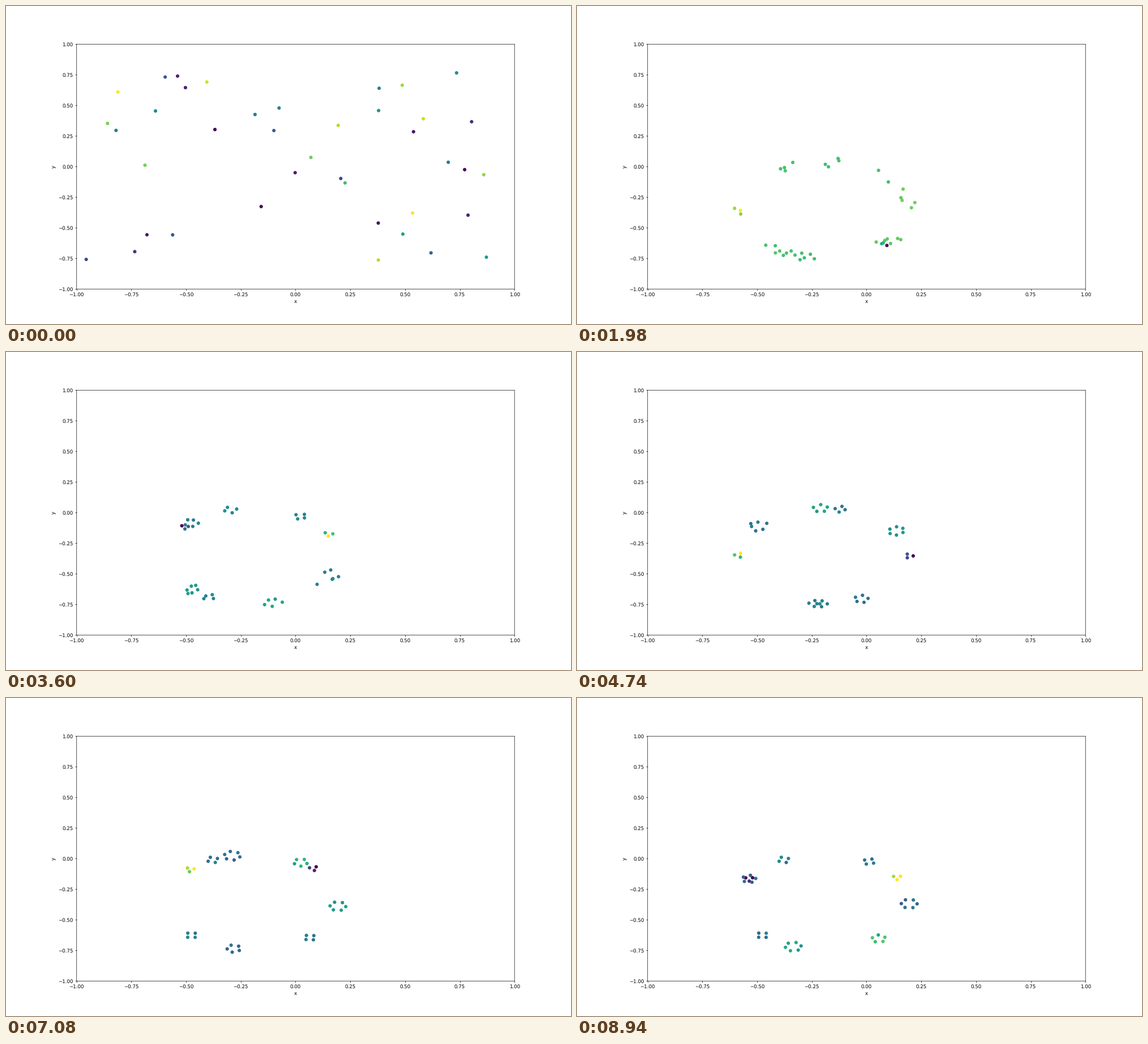
Write a matplotlib script that moves like this. It is 998x561 px and loops after 9 s.

```python
import numpy as np
import matplotlib.pyplot as plt
from matplotlib.animation import FuncAnimation

FRAMES, STEP = 150, 60
DPI = 62.375
CENTRE = np.array([-0.195, -0.355])
RADIUS = 0.39
SPIN = 2.383        # radians per second around the ring
GATHER = 2.6        # seconds for the flocks to draw together
END = (FRAMES - 1) * STEP / 1000

# Last angle in degrees, number of dots, way round, shade.
FLOCKS = [(151, 3, -1, .05), (151, 5, 1, .35), (118, 4, 1, .42),
          (58, 4, -1, .43), (-2, 6, 1, .33), (-50, 5, 1, .66),
          (249, 6, 1, .56), (224, 4, -1, .41), (31, 3, 1, .92)]

plt.rcParams.update({"path.snap": False, "text.hinting": "none"})
rng = np.random.default_rng(12)

# One row per dot: each flock is a small polygon.
angle, size, way, tone, corner = np.array(
    [(np.radians(a), n, w, c, 2 * np.pi * k / n)
     for a, n, w, c in FLOCKS for k in range(n)]).T
COUNT = len(angle)
tone = tone + rng.uniform(-.08, .08, COUNT)
tone[0], tone[-1] = 0, 1


def pace(t):
    """Turning gathers speed for a second, then stays even."""
    return t * t / 2 if t < 1 else t - 0.5


def orbit(t):
    return angle + way * SPIN * (pace(t) - pace(END))


def scatter_start():
    """Random places, handed out in ring order; angle offset and radius."""
    spots = rng.uniform((-.97, -.88), (.97, .83), (COUNT, 2)) - CENTRE
    turn = np.arctan2(spots[:, 1], spots[:, 0]) % (2 * np.pi)
    by_turn = np.argsort(turn)
    by_slot = np.argsort(orbit(0) % (2 * np.pi))
    offset, reach = np.empty(COUNT), np.empty(COUNT)
    offset[by_slot] = turn[by_turn] - orbit(0)[by_slot]
    reach[by_slot] = np.hypot(*spots[by_turn].T)
    return (offset + np.pi) % (2 * np.pi) - np.pi, reach


offset, reach = scatter_start()
first_tone = rng.uniform(0, 1, COUNT)
first_tone[0], first_tone[-1] = 0, 1


def swarm(i):
    t = i * STEP / 1000
    v = min(t, 1)
    v = v * v * (3 - 2 * v)

    a = orbit(t) + offset * np.exp(-(t / GATHER) ** 2)
    r = reach + (RADIUS - reach) * v
    tilt = corner + a
    spread = 0.006 * size * v
    x = r * np.cos(a) + spread * np.cos(tilt)
    y = r * np.sin(a) + spread * np.sin(tilt)

    # Shades start mixed, turn alike, then settle flock by flock.
    level = 0.4 + 0.4 * np.exp(-max(t - 2, 0) / 1.2)
    shade = level + (tone - level) * t / END
    shade[0], shade[-1] = 0, 1
    shade = first_tone + (shade - first_tone) * v
    return CENTRE + np.column_stack([x, y]), shade


fig, ax = plt.subplots(figsize=(16, 8.994), dpi=DPI)
ax.set(xlim=(-1, 1), ylim=(-1, 1), xlabel="x", ylabel="y")
xy, shade = swarm(0)
dots = ax.scatter(*xy.T, c=shade, cmap="viridis", vmin=0, vmax=1)


def draw(i):
    xy, shade = swarm(i)
    dots.set_offsets(xy)
    dots.set_array(shade)
    return dots,


anim = FuncAnimation(fig, draw, frames=FRAMES, interval=STEP, repeat=True,
                     repeat_delay=0, blit=False)
plt.show()
```
